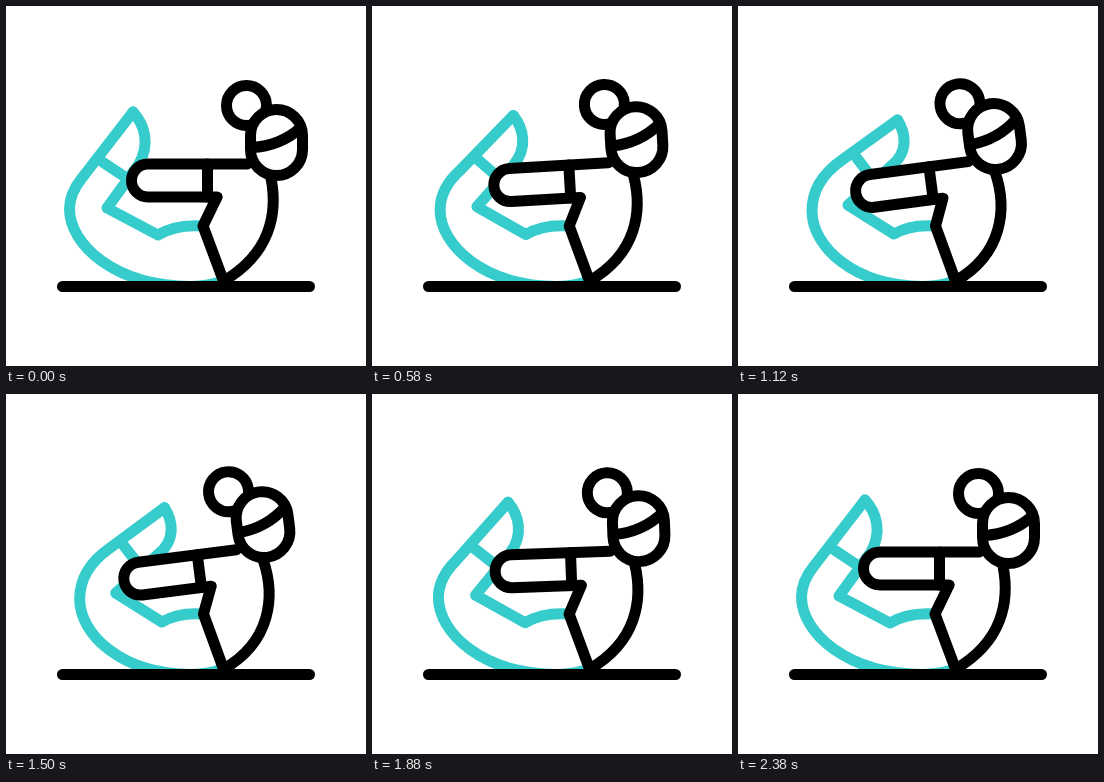
These frames come from a looping animation (360x360 px, 2400 ms). An HTML page:

```html
<!DOCTYPE html>
<html lang="en">
<head>
<meta charset="utf-8">
<title>Bow pose</title>
<style>
  html, body { margin: 0; height: 100%; overflow: hidden; background: #fff; }
  svg { display: block; width: 100vw; height: 100vh; }
</style>
</head>
<body>
<svg viewBox="0 0 360 360" fill="none" stroke="#000" stroke-width="11" stroke-linecap="round" stroke-linejoin="round">
  <g stroke="#36cccc">
    <path id="leg"/>
    <path id="ankle"/>
    <path id="calf"/>
  </g>
  <path id="torso"/>
  <g id="upper">
    <path d="M211 191H142a16.5 16.5 0 0 1 0-33H241" fill="#fff"/>
    <path d="M201.500 158V191"/>
    <circle cx="240.5" cy="99.5" r="20" fill="#fff"/>
    <rect x="244.5" y="103.5" width="52" height="66" rx="26" fill="#fff"/>
    <path d="M246 141.5Q274 140 294.5 122"/>
  </g>
  <path d="M56.500 280.500H303.500"/>
</svg>
<script>
  const LOOP = 2400;
  const TILT = -7.5;
  const PIVOT = '217.5 240';

  // Each path: relaxed pose, stretched pose
  const poses = {
    leg: [
      'M127 106L76 172C67 183 63.5 192 63.5 203C63.5 238 108 280 185 280.5Q203 280 217 275',
      'M159.5 114L104 154C84 168 74 184 74 205C74 240 115 280 185 280.5Q203 280 217 275'
    ],
    ankle: ['M92 153L119 171', 'M115 147L131 168'],
    calf: [
      'M127 106C139 119 144 138 133 158L101 202L152 229Q170 218 197 220',
      'M159.5 114C167 126 172 146 152 161L110 199L156 228Q173 218 197 220'
    ],
    torso: [
      'M211 191L197 220L217.5 275C264 248 272 208 265 172',
      'M205 192L197.5 220L217.5 275C265 248 269.5 202 257 166'
    ]
  };

  const el = id => document.getElementById(id);
  const easeInOut = x => x < 0.5 ? 8 * x ** 4 : 1 - 8 * (1 - x) ** 4;

  function morph([from, to], p) {
    const ends = to.match(/[\d.]+/g);
    let i = 0;
    return from.replace(/[\d.]+/g, n => +n + (ends[i++] - n) * p);
  }

  function draw(now) {
    const phase = now % LOOP / LOOP * 2;
    const p = easeInOut(phase < 1 ? phase : 2 - phase);
    for (const id in poses) el(id).setAttribute('d', morph(poses[id], p));
    el('upper').setAttribute('transform', `rotate(${TILT * p} ${PIVOT})`);
  }

  const start = performance.now();
  function tick() {
    draw(performance.now() - start);
    requestAnimationFrame(tick);
  }
  tick();
</script>
</body>
</html>
```
